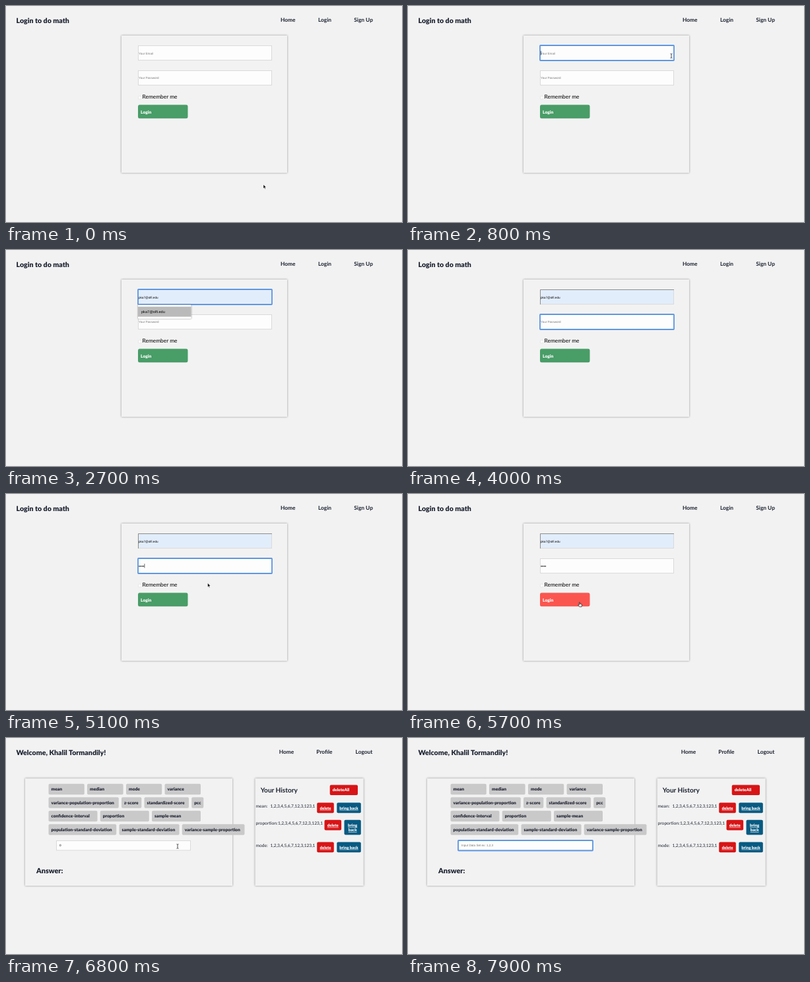
An HTML page for the animation above (8 s loop, 600 px wide and 329 px high).

```html
<!DOCTYPE html>
<html lang="en">
<head>
<meta charset="utf-8">
<title>Login to do math</title>
<style>
html, body { margin: 0; width: 100%; height: 100%; overflow: hidden; background: #f2f2f2; }
svg { display: block; width: 100%; height: 100%; }
text { font-family: Lato, sans-serif; fill: #1b2130; text-rendering: geometricPrecision; white-space: pre; }
.ui { font-family: "Liberation Sans", Arial, sans-serif; }
.panel { fill: #f2f2f2; filter: drop-shadow(0 0 1.6px rgba(0, 0, 0, .42)); }
.popup { fill: #fff; filter: drop-shadow(0 .6px 1px rgba(0, 0, 0, .45)); }
.link { text-decoration: underline; }
</style>
</head>
<body>
<svg id="stage" viewBox="0 0 600 329"></svg>
<script>
const LOOP = 8000;
const EMAIL = 'pka7@olfi.edu';
const EMAIL_2 = 'pka31@silverposts.dorvett.edu';
const RED = '#d81416', BLUE = '#075a82', GREY = '#cac9ca';

const T = {
  focusEmail: 700, type: [1400, 1700, 1800, 1900, 2300], pick: 2700, accept: 2900, closed: 3000,
  focusPass: 3300, dots: [4100, 4300, 4500, 4700], show: 4700, blur: 5600,
  home: 5900, focusData: 7100, clear: 7400
};

const stage = document.getElementById('stage');

function add(parent, tag, attrs = {}) {
  const el = document.createElementNS('http://www.w3.org/2000/svg', tag);
  for (const key in attrs) el.setAttribute(key, attrs[key]);
  parent.appendChild(el);
  return el;
}
const group = (parent = stage) => add(parent, 'g');
const box = (parent, x, y, x2, y2, attrs) =>
  add(parent, 'rect', { x, y, width: x2 - x, height: y2 - y, ...attrs });
function label(parent, x, y, size, weight, str, attrs) {
  const el = add(parent, 'text', { x, y, 'font-size': size, 'font-weight': weight, ...attrs });
  el.textContent = str;
  return el;
}
const show = (el, on) => el.setAttribute('visibility', on ? 'inherit' : 'hidden');
const ui = (parent, x, y, size, str, fill) => label(parent, x, y, size, 400, str, { class: 'ui', style: 'fill:' + fill });

// A text input with border, focus ring, placeholder, value and caret
function makeField(parent, x, y, x2, y2, pad, base, hint) {
  const frame = box(parent, x + .5, y + .5, x2 - .5, y2 - .5, { stroke: '#dadada' });
  const inset = add(parent, 'path', {
    d: `M${x + .5} ${y2}V${y + .5}H${x2}`, fill: 'none', stroke: '#858585', 'stroke-width': .9
  });
  const ring = box(parent, x, y, x2, y2, { fill: 'none', stroke: '#5d97e2', 'stroke-width': 1.8, rx: .8 });
  const tx = x + pad;
  const holder = ui(parent, tx, base, 4.58, hint, '#757575');
  const value = ui(parent, tx, base, 4.62, '', '#000');
  const caret = box(parent, tx, base - 5, tx + .6, base + 1.2, { fill: '#000' });
  return s => {
    frame.setAttribute('fill', s.filled ? '#e2edfb' : '#fdfdfd');
    show(ring, s.focus);
    show(inset, s.filled && !s.focus);
    show(holder, !s.text);
    value.textContent = s.text;
    value.setAttribute('font-size', s.secret ? 6 : 4.62);
    value.setAttribute('y', s.secret ? base + .6 : base);
    show(caret, s.focus && s.caret);
    caret.setAttribute('x', tx + .2 + (s.text ? value.getComputedTextLength() : 0));
  };
}

function header(parent, title, links) {
  label(parent, 15.5, 26.2, 10.6, 900, title);
  for (const [x, str] of links) label(parent, x, 23.7, 8.33, 700, str);
}

// Login page
const login = group();
header(login, 'Login to do math', [[416, 'Home'], [473, 'Login'], [527.3, 'Sign Up']]);
box(login, 175, 45, 426, 254, { class: 'panel' });
const emailField = makeField(login, 200, 60, 403, 83, 1, 73.5, 'Your Email');
const passField = makeField(login, 200, 98, 403, 121, 1, 111.3, 'Your Password');
box(login, 200.5, 137.3, 205, 141.8, { fill: '#fff', stroke: '#d4d4d4', 'stroke-width': .5, rx: .8 });
label(login, 206.5, 141.3, 8.4, 400, 'Remember me', { style: 'fill:#000' });
const button = box(login, 200, 150.5, 275.5, 171.3, { rx: 2.4 });
label(login, 204, 163.6, 6.67, 900, 'Login', { style: 'fill:#fff' });

const popup = group(login);
const list = box(popup, 200, 83.5, 295.5, 120, { class: 'popup', rx: 1 });
const pick = box(popup, 200, 86.3, 280.6, 101.6, { fill: '#bababa' });
ui(popup, 205, 96, 5.6, EMAIL, '#000');
const second = ui(popup, 205, 111.3, 5.6, EMAIL_2, '#000');

// Calculator page
const home = group();
header(home, 'Welcome, Khalil Tormandily!', [[413.7, 'Home'], [470.3, 'Profile'], [529.6, 'Logout']]);
box(home, 29, 61.5, 343, 225, { class: 'panel' });
box(home, 377.5, 61.5, 541.7, 225, { class: 'panel' });

const pills = [
  [[64.5, 118.8, 'mean'], [123, 177.6, 'median'], [182, 236.2, 'mode'], [240.5, 295, 'variance']],
  [[64.5, 170.8, 'variance-population-proportion'], [175, 205.3, 'z-score'], [209.5, 277, 'standardized-score'], [281.2, 299.3, 'pcc']],
  [[64.5, 138.5, 'confidence-interval'], [142.7, 216.8, 'proportion'], [221, 295, 'sample-mean']],
  [[64.5, 167.2, 'population-standard-deviation'], [171.5, 262.6, 'sample-standard-deviation'], [266.8, 361.5, 'variance-sample-proportion']]
];
pills.forEach((row, i) => {
  const y = 69.8 + i * 20.5;
  for (const [x, x2, str] of row) {
    box(home, x, y, x2, y + 16.4, { fill: GREY, rx: 2 });
    label(home, x + 4, y + 10.5, 6.67, 900, str);
  }
});
const dataField = makeField(home, 76, 156, 280, 171.5, 5, 165.4, 'Input Data Set ex: 1,2,3');
label(home, 46, 205.8, 10.85, 900, 'Answer:');

label(home, 385.7, 82.6, 10.1, 700, 'Your History');
box(home, 490.7, 71.4, 533, 87, { fill: RED, rx: 2 });
label(home, 494.7, 81.2, 6.3, 900, 'deleteAll', { style: 'fill:#fff' });

function action(x, x2, y, fill, lines) {
  box(home, x, y, x2, y + 8.7 + 7 * lines.length, { fill, rx: 2 });
  lines.forEach((str, i) => label(home, (x + x2) / 2, y + 10.1 + i * 7.2, 6.05, 900, str,
    { style: 'fill:#fff', 'text-anchor': 'middle', class: 'link' }));
}
function historyRow(name, y, dataX, top, del, back, lines) {
  label(home, 378.6, y, 6.67, 400, name + ':');
  label(home, dataX, y, 6.55, 400, '1,2,3,4,5,6,7,12,3,123,1');
  action(del, del + 25.6, top, RED, ['delete']);
  action(back, 537.8, top, BLUE, lines);
}
historyRow('mean', 106.2, 400.4, 98.6, 471.2, 501.3, ['bring back']);
historyRow('proportion', 132.3, 412, 124.8, 482.5, 512.5, ['bring', 'back']);
historyRow('mode', 166.3, 400.4, 158.6, 471.2, 501.3, ['bring back']);

// Mouse pointers, each with its hot spot at 0,0
const mouse = group();
const pointers = {
  arrow: add(mouse, 'path', {
    d: 'M0 0V6L1.4 4.7L2.3 6.8L3.3 6.4L2.4 4.3H4.2Z', fill: '#000', stroke: '#fff', 'stroke-width': .5
  }),
  beam: add(mouse, 'path', {
    d: 'M-1.5-3.3Q0-3.3 0-2.5Q0-3.3 1.5-3.3M0-2.5V2.5M-1.5 3.3Q0 3.3 0 2.5Q0 3.3 1.5 3.3',
    fill: 'none', stroke: '#222', 'stroke-width': .8
  }),
  hand: add(mouse, 'path', {
    d: 'M-.7 .2Q0-.6 .6 .2V2.5L2.8 2.9Q3.6 3.1 3.5 4L3 6.8H-.2L-2.1 4.4Q-1.9 3.5-.7 4.2Z',
    fill: '#fff', stroke: '#111', 'stroke-width': .7
  })
};

const ease = (t, a, b) => {
  const p = Math.min(1, Math.max(0, (t - a) / (b - a)));
  return p * p * (3 - 2 * p);
};
const count = (times, t) => times.filter(at => at <= t).length;
const inside = (p, x, y, x2, y2) => p.x > x && p.x < x2 && p.y > y && p.y < y2;

// The caret restarts its blink at every key or click
const keys = [T.focusEmail, ...T.type, T.accept, T.focusPass, ...T.dots, T.focusData, T.clear];
function caretOn(t) {
  const last = Math.max(0, ...keys.filter(k => k <= t));
  return Math.floor((t - last) / 500) % 2 === 0;
}

function mouseAt(t) {
  if (t < T.type[0]) {
    const p = ease(t, 50, 650);
    return { x: 390 + 9 * p, y: 272 - 196 * p };
  }
  const p = ease(t, T.show, 5350);
  return { x: 399 - 139 * p, y: 76 + 89 * p };
}

function drawMouse(t, pos, onHome, hover) {
  const hidden = (t >= T.type[0] && t < T.show) || t >= T.clear;
  const overField = onHome || inside(pos, 200, 60, 403, 83) || inside(pos, 200, 98, 403, 121);
  const kind = overField ? 'beam' : hover ? 'hand' : 'arrow';
  mouse.setAttribute('transform', `translate(${pos.x} ${pos.y})`);
  show(mouse, !hidden);
  for (const k in pointers) show(pointers[k], k === kind);
}

function render(t) {
  const onHome = t >= T.home;
  const pos = mouseAt(t);
  const hover = !onHome && inside(pos, 200, 150.5, 275.5, 171.3);
  const caret = caretOn(t);
  show(login, !onHome);
  show(home, onHome);

  const picked = t >= T.pick;
  const typed = count(T.type, t);
  emailField({
    text: picked ? EMAIL : EMAIL.slice(0, typed),
    filled: picked,
    focus: !onHome && t >= T.focusEmail && t < T.focusPass,
    caret: caret && (!picked || t >= T.accept)
  });
  passField({
    text: '•'.repeat(count(T.dots, t)),
    secret: true,
    focus: !onHome && t >= T.focusPass && t < T.blur,
    caret
  });
  dataField({
    text: t < T.clear ? '0' : '',
    focus: onHome && t >= T.focusData,
    caret
  });

  const both = typed < 4;
  show(popup, t >= T.type[1] && t < T.closed);
  list.setAttribute('width', both ? 95.5 : 80.6);
  list.setAttribute('height', both ? 36.5 : 21.2);
  second.setAttribute('display', both ? 'inline' : 'none');
  pick.setAttribute('display', picked ? 'inline' : 'none');
  button.setAttribute('fill', hover ? '#fb5550' : '#499d67');
  drawMouse(t, pos, onHome, hover);
}

const start = performance.now();
function tick() {
  render((performance.now() - start) % LOOP);
  requestAnimationFrame(tick);
}
tick();
</script>
</body>
</html>
```
